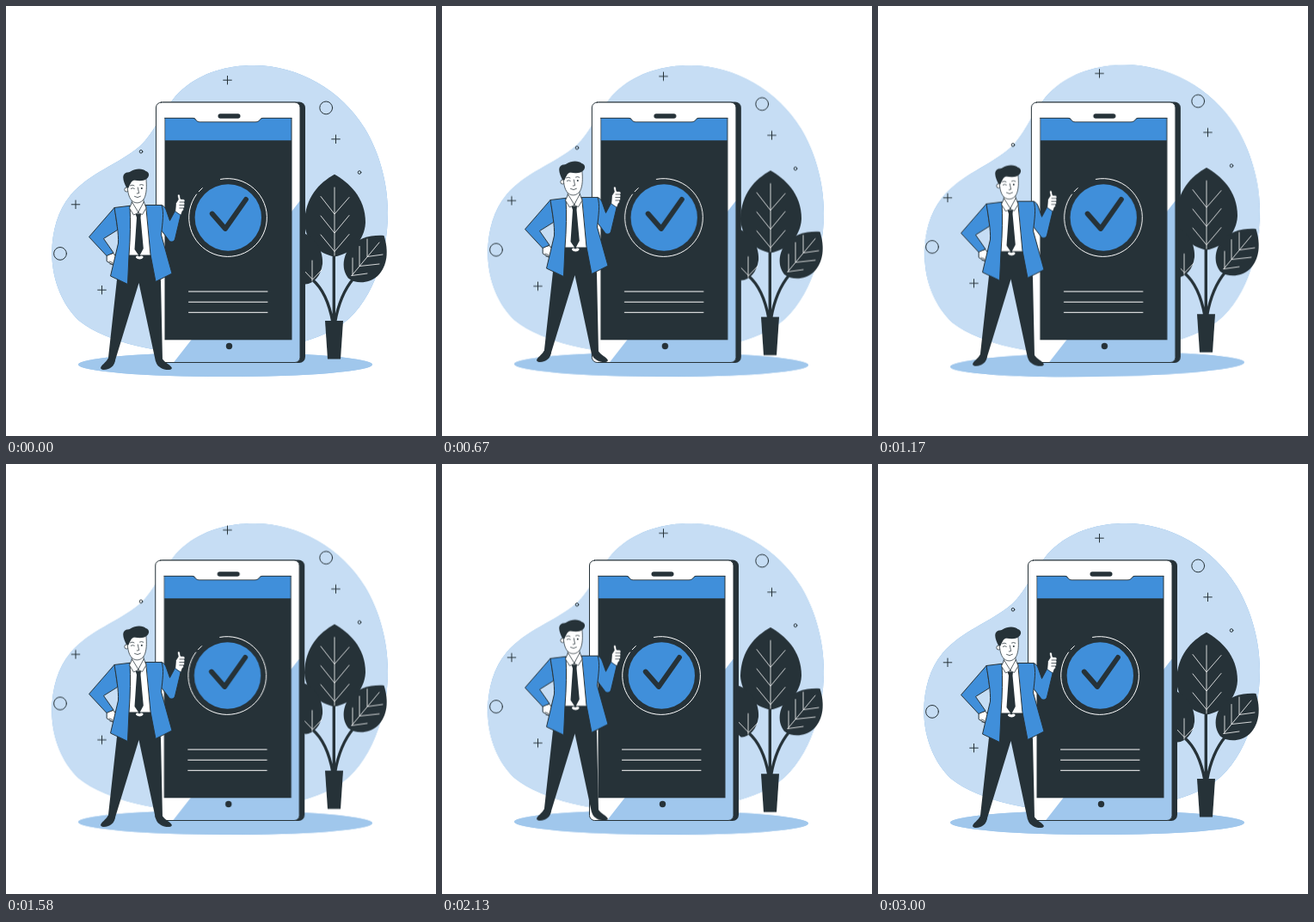
These frames come from a looping animation (500 by 500 pixels, 3.04 s). An HTML page:

```html
<!DOCTYPE html>
<html lang="en">
<head>
<meta charset="utf-8">
<title>Payment confirmed</title>
<style>
  :root { --dark: #263238; --blue: #408fda; --loop: 3.04s; }
  html, body { margin: 0; width: 100%; height: 100%; overflow: hidden; background: #fff; }
  svg { display: block; width: 100vw; height: 100vh; }

  .dark { fill: var(--dark); }
  .blue { fill: var(--blue); }
  .white { fill: #fff; }
  .ink { stroke: var(--dark); stroke-width: 1; stroke-linejoin: round; stroke-linecap: round; }
  .fine { stroke-width: .75; }
  .line { fill: none; }
  .chalk { fill: none; stroke: #fff; stroke-width: 1; stroke-linecap: round; stroke-linejoin: round; }
  .vein { stroke-width: .8; }
  .stem { fill: none; stroke: var(--dark); stroke-width: 3.4; }

  /* 3 s of motion, then a 40 ms rest: 98.684% marks the third second */
  .float { animation: float var(--loop) linear infinite; }
  .bob { animation: bob var(--loop) linear infinite; }
  .shake { animation: shake var(--loop) ease-out infinite; }
  .sway { animation: sway var(--loop) linear infinite; transform-box: fill-box; transform-origin: center; }

  @keyframes float {
    0%, 98.684%, 100% { transform: translateY(0); }
    49.342% { transform: translateY(-10px); }
  }
  @keyframes bob {
    0%, 49.342%, 98.684%, 100% { transform: translateY(0); }
    24.671%, 74.013% { transform: translateY(-10px); }
  }
  @keyframes shake {
    0%, 98.684%, 100% { transform: translateX(0); }
    9.868%, 88.816% { transform: translateX(-1px); }
    19.737%, 78.947% { transform: translateX(2px); }
    29.605%, 49.342%, 69.079% { transform: translateX(-4px); }
    39.474%, 59.211% { transform: translateX(4px); }
  }
  @keyframes sway {
    0%, 98.684%, 100% { transform: rotate(0deg); }
    12.336%, 61.678% { transform: rotate(1deg); }
    37.007%, 86.349% { transform: rotate(-1deg); }
  }
</style>
</head>
<body>
<svg viewBox="0 0 500 500">
  <defs>
    <path id="blob" d="M53.3 288C53.5 262 60 238 75 220C97 194 131 184 155 163.500C174 147 184 115 205 97C228 77 258 69 288 69C340 69 390 98 417 142C434 170 444 205 444 240C444 290 425 350 385 374C350 395 290 404 240 405C180 405 118 392 85 366C66 348 53.800 320 53.300 288Z"/>
    <ellipse id="ground" cx="255" cy="417" rx="171" ry="14"/>
    <path id="plus" d="M-4.8 0H4.8M0 -4.8V4.8"/>
    <clipPath id="front"><rect x="174.5" y="112" width="167.5" height="302.5" rx="6"/></clipPath>
  </defs>

  <!-- Backdrop -->
  <g class="sway">
    <use href="#blob" class="blue"/>
    <use href="#blob" class="white" opacity=".7"/>
  </g>
  <g class="sway">
    <use href="#ground" class="blue"/>
    <use href="#ground" class="white" opacity=".5"/>
  </g>

  <g class="float ink line">
    <use href="#plus" x="257.5" y="86.2"/>
    <use href="#plus" x="383.5" y="154.8"/>
    <use href="#plus" x="81" y="230.8"/>
    <use href="#plus" x="111.5" y="330.2"/>
    <circle cx="372.2" cy="118.4" r="7.4"/>
    <circle cx="63" cy="287.9" r="7.4"/>
    <circle cx="411" cy="193.5" r="1.8"/>
    <circle cx="157" cy="169.3" r="1.8"/>
  </g>

  <!-- Plant -->
  <g class="float">
    <path class="stem" d="M381.3 285V368M356 318C368 328 376 346 380 368M404 317C393 330 386 348 382.500 368"/>
    <path class="dark" d="M382 195.800C398 205 418 222 418 252C417 272 402 288 382 291.500C362 288 348 272 347 252C348 222 364 206 382 195.800Z"/>
    <path class="dark" d="M343 263C360 268 369 284 368 300C366 314 358 323 348 323.500C338 318 334 285 343 263Z"/>
    <path class="dark" d="M439.500 267C445 284 444 302 432 314C422 322.500 408 324 398 316.500C391 308 390 293 400 280.500C409 270 424 266 439.500 267Z"/>
    <path class="chalk vein" d="M382 211V290M366 221.500L382 242L399 222.500M366 244L382 264L399 243.500M366 266L382 285.500L399 265.500"/>
    <path class="chalk vein" d="M356 296V320M345 306L356.500 318L367 307"/>
    <path class="chalk vein" d="M402 313.500L434 275M403 293V312M411 279.500V302.500L434 300M420 271V291.500L438 289M402 313.500L420 311"/>
    <path class="dark" d="M371 366H392L389 410.500H374Z"/>
  </g>

  <!-- Phone -->
  <g class="shake">
    <rect class="dark" x="176" y="111.500" width="172" height="303.500" rx="7"/>
    <g clip-path="url(#front)">
      <path class="white" d="M174 111H343V415H174Z"/>
      <path fill="#a0c7ed" d="M343 225L194.500 415H343Z"/>
    </g>
    <rect class="ink line" x="174.500" y="112" width="167.500" height="302.500" rx="6"/>
    <rect class="dark" x="184.500" y="130" width="148" height="258.300"/>
    <path class="blue" d="M185.200 130.500H217C221 130.500 220.500 135 225.500 135H290C295.500 135 295 130.500 299 130.500H331.500V156.200H185.200Z"/>
    <path class="white" d="M217 129.300C221.500 130 220.500 134.800 225.500 134.800H290C295.500 134.800 295 130 299 129.300Z"/>
    <path class="ink fine line" d="M184.500 130.300H217C221 130.300 220.500 134.900 225.500 134.900H290C295.500 134.900 295 130.300 299 130.300H332"/>
    <rect class="dark" x="246.500" y="125.300" width="26" height="5.400" rx="2.700"/>
    <circle class="blue" cx="258.300" cy="246" r="38.700"/>
    <path class="chalk" d="M249.500 201.400A45.400 45.400 0 1 1 221.500 219M224.200 215.800L228.300 211.700"/>
    <path class="line" stroke="#263238" stroke-width="5.800" stroke-linecap="round" stroke-linejoin="round" d="M239.700 241.500L255 259L279 224.800"/>
    <path class="chalk" d="M212.500 332H304M212.500 344.200H304M212.500 356.300H304"/>
    <circle class="dark" cx="259.500" cy="395.500" r="3.700"/>
  </g>

  <!-- Man -->
  <g class="bob">
    <path class="dark" d="M118.500 410L127 412C126 417 124 420 119 422C115 423.500 111 423.500 110 421C111 417 116 415 118.500 410Z"/>
    <path class="dark" d="M174 412L182 410.500C185 415 191 417 193 421C192 423.500 188 423.500 184 422.500C178 420.500 174.500 417 174 412Z"/>
    <path class="dark" d="M134 288H176L180 320L182 412L174 413.500L154.500 322L126.500 413.500L118.700 411.500L129 318Z"/>

    <!-- Shirt, tie and belt -->
    <path class="white ink" d="M143 233L152 230L165 232L169 290H142Z"/>
    <path class="dark" d="M150.500 241.500H157L156.500 246L159.800 282L155 291L149.500 283L152 246Z"/>
    <path class="white" d="M151 292.500C151 290 153 289.800 155 291.500C157 289.800 160 290 159.500 292.500C158 295 153 295 151 292.500Z"/>

    <!-- Resting hand and arm -->
    <path class="white ink" d="M117.500 289L125 287.500L129.500 293.500L129 299L124 301L117.500 297Z"/>
    <path class="line ink fine" d="M120 297L124 298.500M121 300L126 300"/>
    <path class="blue ink" d="M126 234.500L96.500 268.500L117 290.500L125 287L113.500 270.500L129.500 260.500Z"/>

    <!-- Raised arm and hand -->
    <path class="blue ink" d="M181 231.500C184 232.500 185.500 235 186.500 238L190.500 249.500L197.500 236.500L203.500 241.500L196.500 271C195.500 274.500 191.500 275 189.500 272.500L180 260Z"/>
    <path class="white ink fine" d="M196.800 238.500L197.500 229.500L200.300 225L199.500 220.500C199.800 218.300 202 218.500 202.300 220.500L203 224.300L207 224.800C208.500 226 208.200 227.500 207.200 228C208.300 229 208 231 207 231.500C208 233 207.500 234.500 206.500 235C207 237 206.200 238 205.200 238.300L203.500 243Z"/>
    <path class="line ink fine" d="M202 228H207M201.800 231.500H206.800M201.800 235H206.200"/>

    <!-- Jacket -->
    <path class="blue ink" d="M144 232.300L126 234.500C128.500 250 131 264 130.500 276L121.500 314L141.500 323.500L143 290Q145.500 258 144 232.300Z"/>
    <path class="blue ink" d="M163 231.500L181 231.500C184 240 182 252 180.500 266L193 311L174 320.500L168 289Z"/>

    <!-- Head -->
    <path class="white ink fine" d="M146.500 222L146 231L153.500 241L160.500 231L159.500 222Z"/>
    <path class="white ink fine" d="M146.500 228.500L143.500 235L148.500 243L153.800 240.500ZM160.500 228L163 235L158.500 242.500L153.800 240.500Z"/>
    <circle class="white ink fine" cx="140.300" cy="213.500" r="2.500"/>
    <path class="white ink fine" d="M141 203L162.800 200C163.800 210 163.500 218 160.800 223.500C157.500 229.500 151 230.500 146.500 226.500C142 222 141 214 141 203Z"/>
    <path class="dark" d="M140 211C137.500 206 134.500 199 137.500 195.500C140 192.500 143.500 194 145.500 192C150 188.500 160 188.500 162.500 192C165.500 192.500 167.500 196 165 199.500C161.500 204 155 203.500 149 202.500C145.500 203.500 144.500 207 142.500 211.500Z"/>
    <path class="line ink fine" d="M144.500 208.800Q147 207.300 149 208.800M155.500 208Q157.700 206.800 159.800 208.200M145.300 212.300Q147.300 211 149.300 212.300M153.300 211L154.600 217.700L152.300 218M149.500 221.500Q153 224 156.500 221.300"/>
    <circle class="dark" cx="157.800" cy="212" r="1"/>
  </g>
</svg>
</body>
</html>
```
